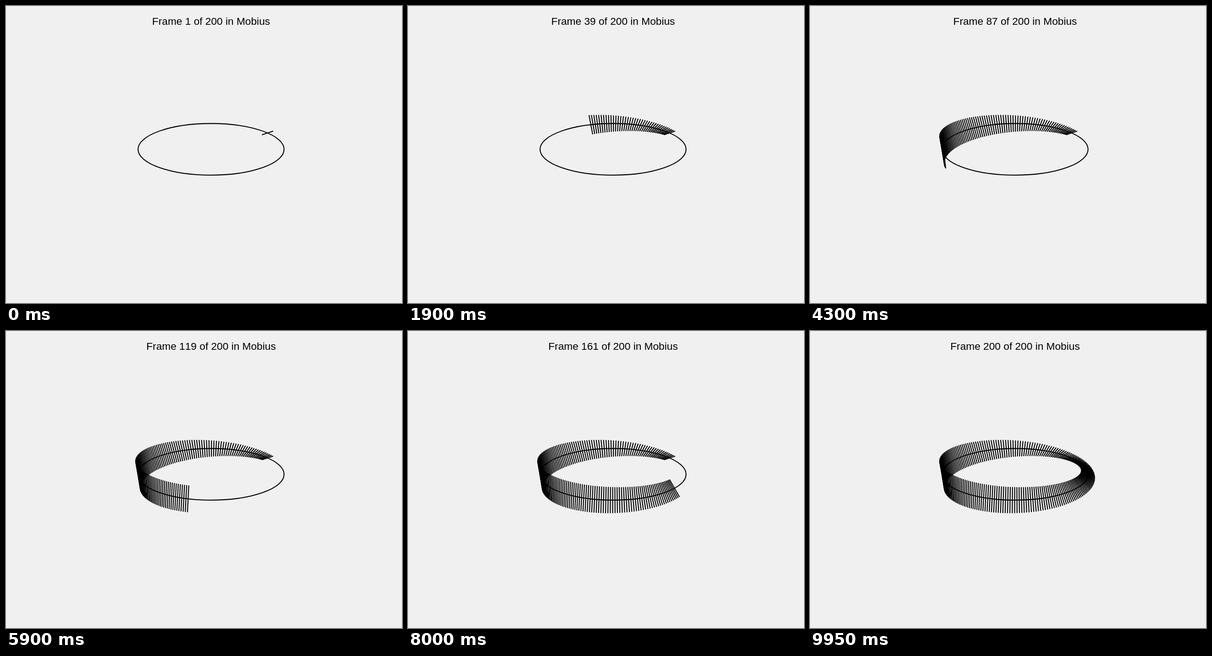
Write an HTML page that moves like this. It is 864 px wide and 648 px high and loops after 10000 ms.

```html
<!DOCTYPE html>
<html lang="en">
<head>
<meta charset="utf-8">
<title>Mobius strip</title>
<style>
html, body { margin: 0; width: 100%; height: 100%; overflow: hidden; background: #f0f0f0; }
svg { display: block; width: 100vw; height: 100vh; }
text { font: 22.7px "Liberation Sans", Arial, sans-serif; font-kerning: none; text-anchor: middle; }
ellipse, line { fill: none; stroke: #000; stroke-width: 2.08; }
</style>
</head>
<body>
<svg viewBox="0 0 864 648">
  <text id="title" x="447.5" y="41"></text>
  <ellipse cx="447.4" cy="312.7" rx="159.3" ry="56.3"/>
  <g id="ribs"></g>
</svg>
<script>
const COUNT = 200, STEP = 50;
const CX = 447.4, CY = 312.7, RX = 159.3, RY = 56.3;
const HALF = 0.1;      // half width of the strip, circle radius 1
const RISE = 289;      // pixels per unit of height
const TURN = 37.5 * Math.PI / 180;

const title = document.getElementById("title");
const ribs = document.getElementById("ribs");

// Point on the strip at angle t, offset w across its width
function project(t, w) {
  const r = 1 + w * Math.cos(t / 2);
  const z = w * Math.sin(t / 2);
  return [
    CX + RX * r * Math.cos(t + TURN),
    CY - RY * r * Math.sin(t + TURN) - RISE * z
  ];
}

function addRib(i) {
  const t = 2 * Math.PI * i / COUNT;
  const [x1, y1] = project(t, -HALF);
  const [x2, y2] = project(t, HALF);
  const line = document.createElementNS("http://www.w3.org/2000/svg", "line");
  Object.entries({ x1, y1, x2, y2 }).forEach(([k, v]) => line.setAttribute(k, v.toFixed(2)));
  ribs.appendChild(line);
  return line;
}

const lines = Array.from({ length: COUNT }, (_, i) => addRib(i + 1));
let shown = 0;

function render(ms) {
  const n = Math.floor(ms / STEP) % COUNT + 1;
  if (n === shown) return;
  shown = n;
  title.textContent = `Frame ${n} of ${COUNT} in Mobius`;
  lines.forEach((line, i) => line.setAttribute("visibility", i < n ? "visible" : "hidden"));
}

const start = performance.now();
function tick() {
  render(performance.now() - start);
  requestAnimationFrame(tick);
}
tick();
</script>
</body>
</html>
```
